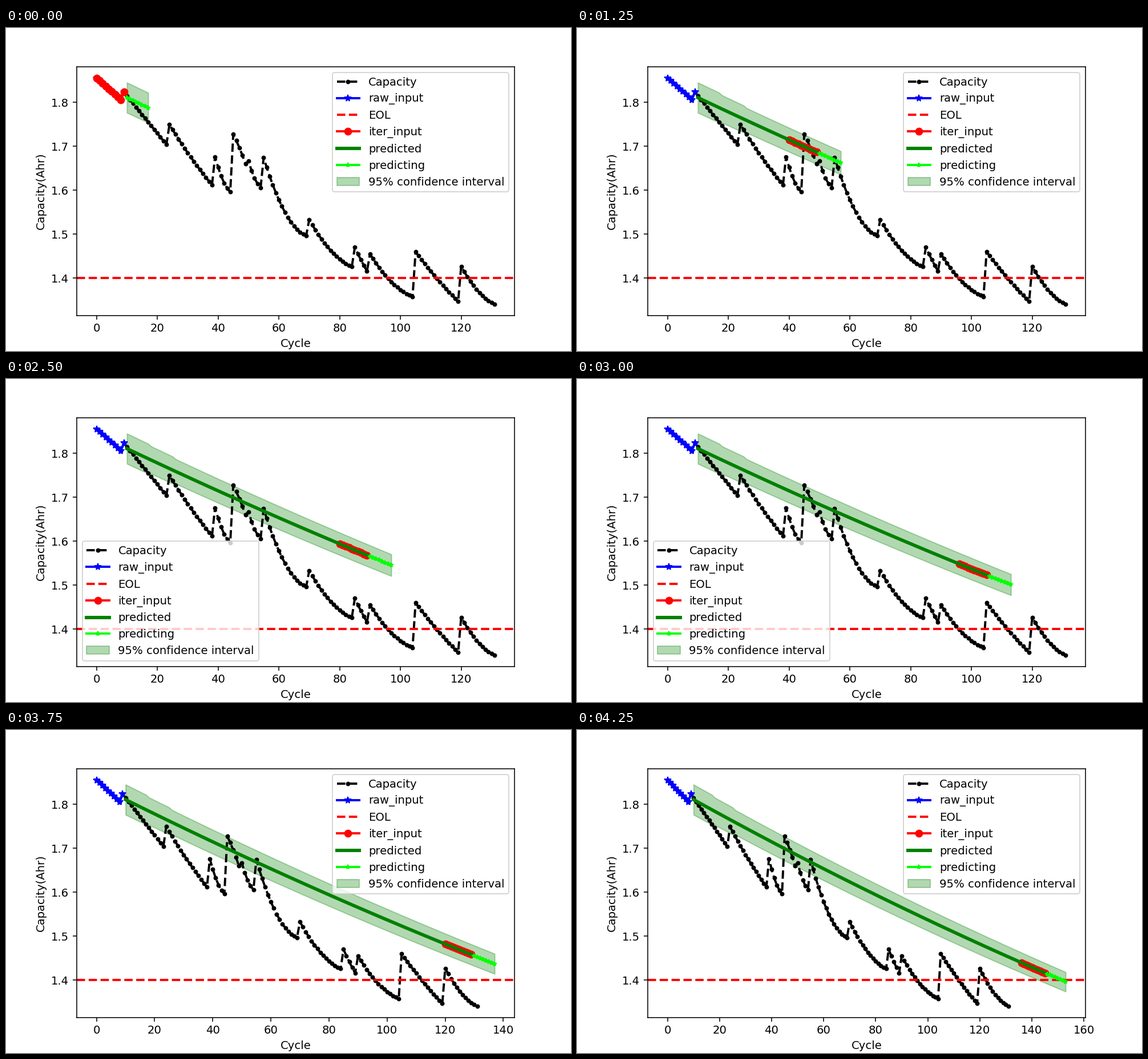
Write a matplotlib script that moves like this. It is 990 px wide and 566 px high and loops after 4500 ms.

```python
import numpy as np
import matplotlib.pyplot as plt
from matplotlib.animation import FuncAnimation

DPI = 141.5
FRAMES = 18
INTERVAL = 250
WINDOW = 10   # cycles fed to the model
STEP = 8      # cycles predicted per iteration
LAST_CYCLE = 131

# Each discharge run: first cycle, peak and final capacity, sag of the curve
RUNS = [
    (0, 1.855, 1.806, 0.0), (9, 1.823, 1.704, 0.0), (24, 1.749, 1.612, 0.15),
    (39, 1.676, 1.596, 0.6), (45, 1.727, 1.660, -0.2), (50, 1.667, 1.606, 0.6),
    (55, 1.674, 1.497, 0.8), (70, 1.533, 1.426, 0.6), (85, 1.470, 1.416, 0.1),
    (90, 1.455, 1.358, 0.6), (105, 1.460, 1.347, 0.15), (120, 1.427, 1.341, 0.6),
]

plt.rcParams["font.family"] = "DejaVu Sans"


def discharge(count, peak, final, sag):
    u = np.linspace(0, 1, count)
    return peak + (final - peak) * (u + sag * u * (1 - u))


def measured_capacity():
    starts = [run[0] for run in RUNS] + [LAST_CYCLE + 1]
    lengths = np.diff(starts)
    return np.concatenate([discharge(n, *run[1:])
                           for n, run in zip(lengths, RUNS)])


def predict(cycle):
    d = cycle - WINDOW
    return 1.8105 - 0.003276 * d + 2.66e-6 * d**2


def half_width(cycle):
    # The band narrows in steps as the first two batches pass
    early = (cycle < WINDOW + STEP) * 1 + (cycle < WINDOW + 2 * STEP)
    return 0.0287 - 4.6e-5 * (cycle - WINDOW) + 0.0028 * early


capacity = measured_capacity()
cycles = np.arange(WINDOW + STEP * FRAMES)
series = predict(cycles)
series[:WINDOW] = capacity[:WINDOW]

fig, ax = plt.subplots(figsize=(990 / DPI, 566 / DPI), dpi=DPI)


def plot_range(start, stop, *style, **kwargs):
    ax.plot(cycles[start:stop], series[start:stop], *style, **kwargs)


def draw(frame):
    first = STEP * frame
    split = first + WINDOW
    end = split + STEP

    ax.clear()
    ax.plot(capacity, "k.--", lw=2, label="Capacity")
    plot_range(0, WINDOW, "b*-", lw=2, label="raw_input")
    ax.axhline(1.4, color="red", ls="--", lw=2, label="EOL")
    plot_range(first, split, "ro-", lw=2, label="iter_input")
    plot_range(WINDOW, split, color="green", lw=3, label="predicted")
    plot_range(split, end, "*-", color="lime", lw=2, ms=4, label="predicting")

    span = cycles[WINDOW:end]
    center, margin = predict(span), half_width(span)
    ax.fill_between(span, center - margin, center + margin, color="green",
                    alpha=0.3, label="95% confidence interval")

    ax.set_xlabel("Cycle")
    ax.set_ylabel("Capacity(Ahr)")
    ax.legend(loc="lower left" if 8 <= frame <= 14 else "upper right")
    return []


anim = FuncAnimation(fig, draw, frames=FRAMES, init_func=lambda: draw(0),
                     interval=INTERVAL, repeat=True, repeat_delay=0)
plt.show()
```
